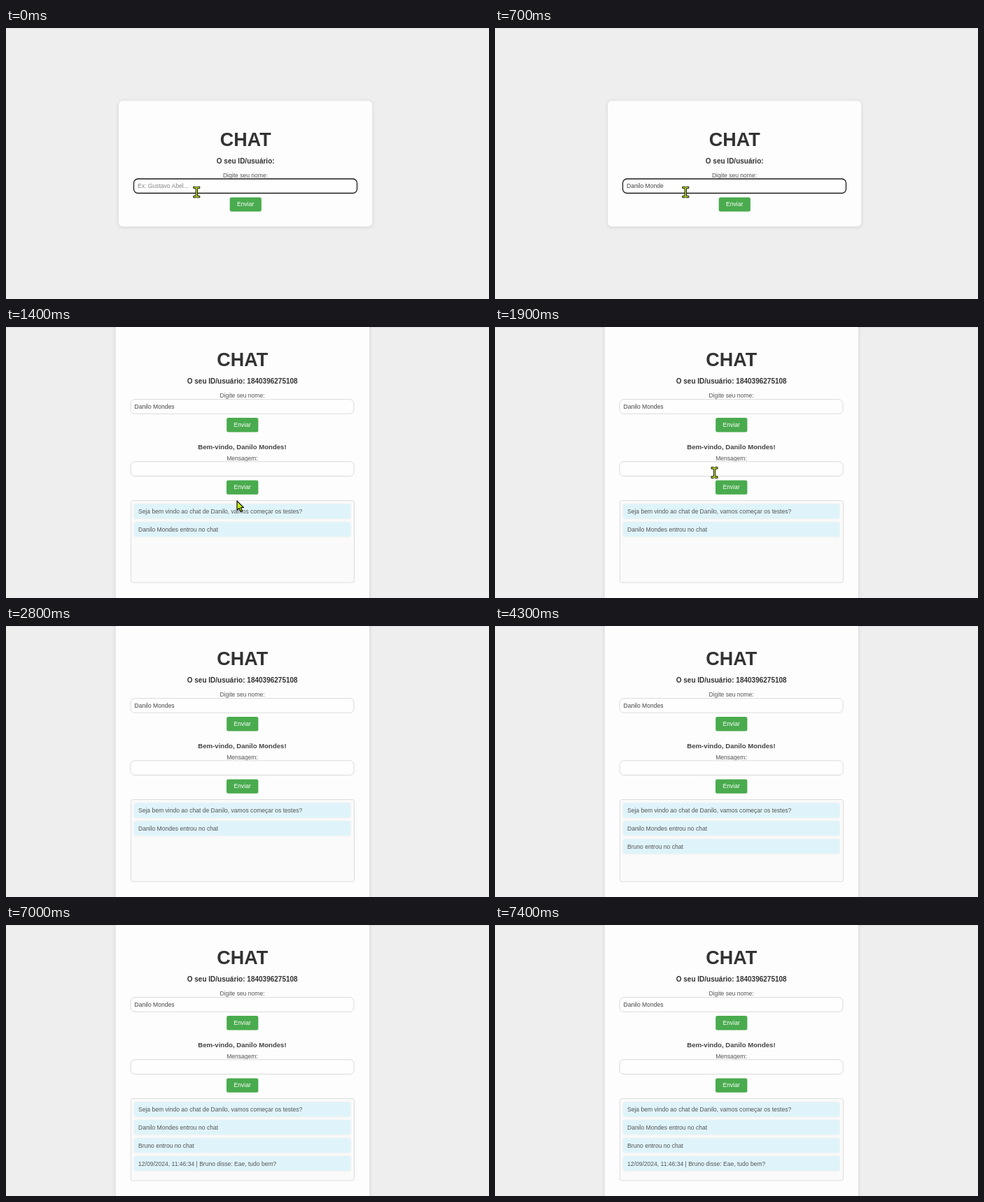
An HTML page that plays this animation: 690x388 px, repeating every 8000 ms.

```html
<!DOCTYPE html>
<html lang="pt-BR">
<head>
<meta charset="utf-8">
<title>Chat</title>
<style>
  html, body { margin: 0; width: 100%; height: 100%; overflow: hidden; background: #eeeeee; }
  svg { display: block; width: 690px; height: 388px; font: 8.55px "Liberation Sans", Arial, sans-serif; fill: #555; }
  .mid { text-anchor: middle; }
  .title { font-size: 27px; font-weight: bold; fill: #333; }
  .head { font-size: 10px; font-weight: bold; fill: #333; }
  .card { fill: #fdfdfd; filter: drop-shadow(0 1.5px 2.5px rgba(0, 0, 0, .13)); }
  .field { fill: #fefefe; stroke: #dadada; stroke-width: 1; }
  .field.focus { stroke: #1c1c1c; stroke-width: 1.3; }
  .button rect { fill: #49ab4e; }
  .button.hover rect { fill: #439d48; }
  .button text { fill: #fff; }
  .value { fill: #444; }
  .value.hint { fill: #858585; }
  .log { fill: #fafafa; stroke: #dcdcdc; }
  .message rect { fill: #dff4fa; filter: drop-shadow(0 .5px .8px rgba(0, 0, 0, .09)); }
  .cursor { stroke: #111; stroke-width: 1.2; stroke-linejoin: round; fill: #c5ee12; }
  #hand { fill: #e3f50b; }
</style>
</head>
<body>
<svg viewBox="0 0 690 388">
  <rect width="690" height="388" fill="#eeeeee"/>
  <rect width="690" height="1" fill="#dfdfdf"/>
  <rect id="card" class="card"/>

  <g id="login">
    <text class="title mid" x="342.3" y="168.5">CHAT</text>
    <text id="userId" class="head mid" x="342.2" y="193.5"></text>
    <text class="mid" x="342" y="213.5">Digite seu nome:</text>
    <rect id="nameField" class="field" x="182.5" y="216" width="319" height="20.5" rx="6"/>
    <text id="name" class="value" x="188" y="229.3"></text>
    <g id="enter" class="button">
      <rect x="319.7" y="242.4" width="45.2" height="20.3" rx="2.5"/>
      <text class="mid" x="342.2" y="255.4">Enviar</text>
    </g>
  </g>

  <g id="room">
    <text class="head mid" x="337.5" y="175" style="font-size:9.6px;fill:#444">Bem-vindo, Danilo Mondes!</text>
    <text class="mid" x="337.5" y="190.5">Mensagem:</text>
    <rect class="field" x="178" y="192.8" width="319.2" height="20.7" rx="6"/>
    <g id="send" class="button">
      <rect x="315" y="219.4" width="45.4" height="20.3" rx="2.5"/>
      <text class="mid" x="337.7" y="232.3">Enviar</text>
    </g>
    <rect class="log" x="178.5" y="248.5" width="319" height="117.5" rx="3"/>
    <g id="log"></g>
  </g>

  <path id="beam" class="cursor" style="stroke-width:1"
    d="M-4.5-7.8H-1L0-7L1-7.8H4.5V-5.4H1.2V5.4H4.5V7.8H1L0 7L-1 7.8H-4.5V5.4H-1.2V-5.4H-4.5Z"/>
  <path id="arrow" class="cursor" d="M0 0V13.2L3.1 10.4L5.4 15.5L7.7 14.5L5.4 9.5H9.5Z"/>
  <path id="hand" class="cursor"
    d="M-1.4 1.2Q0-.6 1.4 1.2V6.3Q3-.1+5.8 4.2 6.8Q5.8 5.6 6.7 7.6Q8.3 6.9 8.5 9V13Q8 16 6.6 18H-1.2Q-2.6 15.4-6.2 11.7Q-6.2 9.5-4 10.2L-1.4 12.2Z"/>
</svg>

<script>
const LOOP = 8000;
const ROOM_AT = 1400;
const NAME = "Danilo Mondes";
const HINT = "Ex: Gustavo Abel...";

// time, letters typed
const typing = [[0, 0], [100, 2], [200, 4], [300, 5], [400, 7], [500, 8], [600, 10], [700, 12], [800, 13]];

// time, shape, x, y
const pointer = [
  [0, "beam", 272.3, 235],
  [1000, "beam", 276, 234],
  [1100, "arrow", 290, 242],
  [1200, "arrow", 308, 247],
  [1300, "hand", 330, 248.5],
  [1400, "arrow", 330, 249],
  [1700, "hand", 337, 226],
  [1800, "beam", 328, 181],
  [1900, "beam", 313.5, 208.5],
  [2700, "beam", 304.5, 214.5],
  [2800, "", 0, 0]
];

const messages = [
  [1400, "Seja bem vindo ao chat de Danilo, vamos começar os testes?"],
  [1400, "Danilo Mondes entrou no chat"],
  [4300, "Bruno entrou no chat"],
  [7000, "12/09/2024, 11:46:34 | Bruno disse: Eae, tudo bem?"]
];

const $ = id => document.getElementById(id);
const at = (steps, t) => steps.findLast(step => step[0] <= t);
const show = (el, on) => { el.style.display = on ? "" : "none"; };
const set = (el, attrs) => { for (const k in attrs) el.setAttribute(k, attrs[k]); };

// A clean path for the pointing hand
$("hand").setAttribute("d",
  "M-1.5 1.3Q0-.8 1.5 1.3V6.2Q3.4 5 4.1 6.9Q5.9 5.9 6.5 7.8Q8.2 7.2 8.3 9.2V13" +
  "Q8 15.8 6.6 18H-1.2Q-2.6 15.2-6.2 11.6Q-6 9.3-3.9 10.2L-1.5 12.2Z");

const rows = messages.map(([, text], i) => {
  const y = 253.7 + i * 25.8;
  const row = document.createElementNS("http://www.w3.org/2000/svg", "g");
  row.setAttribute("class", "message");
  row.innerHTML = `<rect x="183.3" y="${y}" width="308.8" height="20.6" rx="2.5"/>
    <text x="189" y="${y + 13.5}">${text}</text>`;
  return $("log").appendChild(row);
});

function draw(t) {
  const inRoom = t >= ROOM_AT;
  set($("card"), inRoom
    ? { x: 156.7, y: -20, width: 362.3, height: 440, rx: 0 }
    : { x: 161, y: 104.3, width: 362.2, height: 179.9, rx: 6 });
  $("login").setAttribute("transform", inRoom ? "translate(-4.5 -112.3)" : "");
  $("userId").textContent = "O seu ID/usuário:" + (inRoom ? " 1840396275108" : "");
  show($("room"), inRoom);

  const typed = at(typing, t)[1];
  $("name").textContent = typed ? NAME.slice(0, typed) : HINT;
  $("name").classList.toggle("hint", !typed);
  $("nameField").classList.toggle("focus", t < 1300);

  const [, shape, x, y] = at(pointer, t);
  for (const id of ["beam", "arrow", "hand"]) show($(id), id === shape);
  if (shape) $(shape).setAttribute("transform", `translate(${x} ${y})`);
  $("enter").classList.toggle("hover", shape === "hand" && !inRoom);
  $("send").classList.toggle("hover", shape === "hand" && inRoom);

  rows.forEach((row, i) => show(row, t >= messages[i][0]));
}

const start = performance.now();
function tick() {
  draw((performance.now() - start) % LOOP);
  requestAnimationFrame(tick);
}
tick();
</script>
</body>
</html>
```
